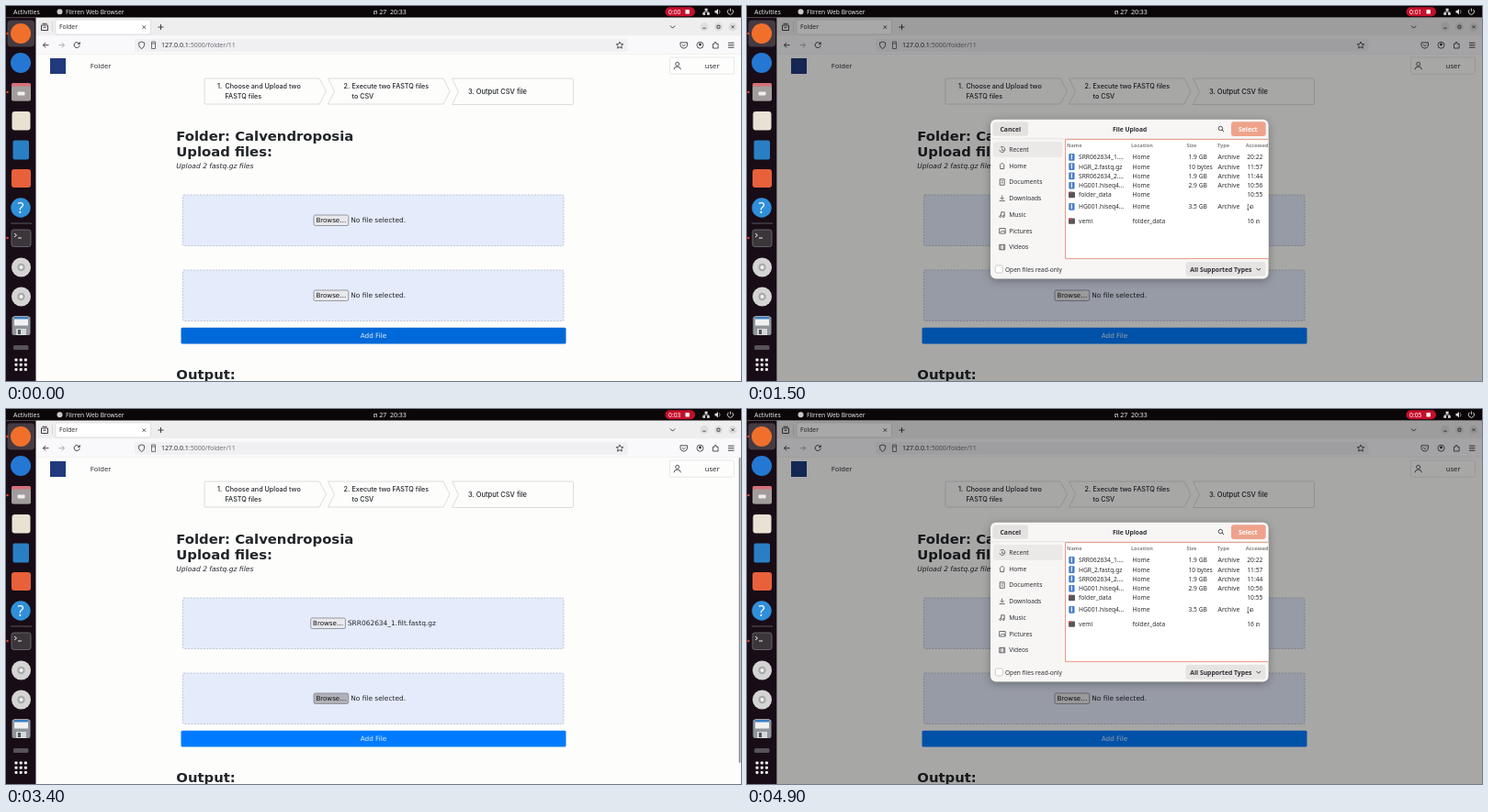
Write an HTML page that moves like this. It is 800 px wide and 409 px high and loops after 5400 ms.

```html
<!DOCTYPE html>
<html lang="en">
<head>
<meta charset="utf-8">
<title>Upload files</title>
<style>
html, body { margin: 0; width: 100%; height: 100%; overflow: hidden; background: #fdfdfc; }
svg { display: block; }
text { font-family: "Noto Sans", "DejaVu Sans", sans-serif; white-space: pre; }
.page { font-family: "DejaVu Sans", sans-serif; }
.step { font-family: Inter, sans-serif; font-weight: 500; }
.b { font-weight: 700; }
.i { font-style: italic; }
#dialog { filter: drop-shadow(0 2px 5px rgba(0, 0, 0, .3)); }
</style>
</head>
<body>
<svg id="stage" width="800" height="409" viewBox="0 0 800 409"></svg>
<script>
const INK = '#2e2e33', PAGE = '#212529';

const text = (x, y, s, size, fill = INK, extra = '') =>
  `<text x="${x}" y="${y}" font-size="${size}" fill="${fill}" ${extra}>${s}</text>`;
const rect = (x, y, w, h, fill, r = 0, extra = '') =>
  `<rect x="${x}" y="${y}" width="${w}" height="${h}" rx="${r}" fill="${fill}" ${extra}/>`;
const disc = (x, y, r, fill, extra = '') =>
  `<circle cx="${x}" cy="${y}" r="${r}" fill="${fill}" ${extra}/>`;
const line = (d, stroke = INK, w = .9, fill = 'none', extra = '') =>
  `<path d="${d}" stroke="${stroke}" stroke-width="${w}" fill="${fill}" ${extra}/>`;

function topBar() {
  return rect(0, 0, 800, 12.5, '#0b0608') +
    text(8, 9, 'Activities', 6.9, '#e6e6e6') +
    disc(58.5, 6.2, 3, '#c9c9c9') +
    text(65, 9, 'Flirren Web Browser', 6.7, '#e6e6e6') +
    text(400, 9.4, 'ຕ 27  20:33', 7, '#f0f0f0') +
    rect(717.5, 1.2, 32.5, 10, '#c5102c', 5) +
    text(721, 8.8, '0:00', 6.8, '#fff', 'id="timer"') +
    rect(739.5, 4, 4.4, 4.4, '#fff', .5) +
    rect(760.6, 2.7, 3, 2.6, '#ddd') + rect(758.3, 7.2, 2.8, 2.6, '#ddd') + rect(763, 7.2, 2.8, 2.6, '#ddd') +
    line('M762 5v1.3M759.7 7.5V6.3h4.7v1.2', '#ddd', .7) +
    line('M771.5 5h1.5l2-2v6.6l-2-2h-1.5z', 'none', 0, '#ddd') +
    line('M776.3 4.3q1.6 2 0 4', '#aaa', .8) +
    line('M786.4 3.8a3.1 3.1 0 1 0 4 0M788.4 2.5v3.4', '#ddd', .9);
}

function cd(y) {
  return disc(16.5, y, 10.5, '#d4d4d4') + disc(16.5, y, 4.2, '#a9a9a9') + disc(16.5, y, 2, '#f5f5f5');
}

function dock() {
  let s = rect(0, 12.5, 32.5, 396.5, '#180d16') + rect(1.5, 15.5, 29.5, 29, '#453b42', 4);
  for (const y of [30, 94, 253]) s += disc(1.5, y, 1.3, '#e0432a');
  s += disc(16, 30, 11, '#f0702b') + disc(16, 62, 11, '#2478d4');
  s += rect(6, 84, 21, 19.5, '#777', 2.5) + rect(6, 84, 21, 5, '#d6707a', 2) + rect(6, 87.5, 21, 16, '#a29d9c', 2) +
    rect(12.5, 93.5, 8, 4, '#eee', 1);
  s += rect(6.5, 115, 20, 20.5, '#e9e2d3', 3) + rect(7.5, 146.5, 17.5, 21, '#2a7fc4', 2) +
    rect(6, 178, 21, 20, '#e8613a', 3);
  s += disc(16, 220, 10.7, '#2f8fd8') + text(16, 225.8, '?', 16, '#fff', 'text-anchor="middle"');
  s += rect(5, 236.6, 23, .8, '#6d656b');
  s += rect(6, 244, 21, 18.5, '#3a363a', 2.5, 'stroke="#77727a" stroke-width=".8"') +
    line('M9 248l2.5 2-2.5 2M13 253h4', '#eee', 1);
  s += cd(285) + cd(317);
  s += rect(6.5, 338.5, 20, 20.5, '#8f959b', 2) + rect(9, 338.5, 15, 10, '#f1f1f1') +
    rect(9, 339, 15, 2.5, '#3d7fc0') + rect(11, 352, 11, 7, '#d5d8da') + rect(13, 353, 3, 5, '#555');
  s += rect(8, 370, 16.5, 5, '#55525a', 1.5);
  for (let k = 0; k < 9; k++) s += rect(9.5 + k % 3 * 5.2, 384.5 + (k / 3 | 0) * 5.2, 3, 3, '#f2f2f2', .8);
  return s;
}

function chrome() {
  return rect(32.5, 12.5, 767.5, 20, '#efeeee') +
    line('M38.5 21h7v5.5h-7zM39.5 19.3h5M40.5 23.3h3') +
    line('M50.5 17v11', '#c9c9cc', .6) +
    rect(54, 15, 103.5, 16, '#fff', 2, 'stroke="#cfcfd4" stroke-width=".6"') +
    text(58, 25.3, 'Folder', 6.7) +
    line('M148.5 21.3l3.6 3.6m0-3.6l-3.6 3.6', INK, .8) +
    line('M165.5 23h6m-3-3v6') +
    line('M723 21.5l2.6 2.6 2.6-2.6') +
    [760, 775.5, 791].map(x => disc(x, 22.7, 4.6, '#dededf')).join('') +
    line('M758.3 24.2h3.4M774 21.2h3v3h-3zM789.5 21.2l3 3m0-3l-3 3', INK, .8) +
    rect(32.5, 32.5, 767.5, 20, '#f9f9fb') +
    line('M46.5 42.7h-6m2.6-2.7l-2.7 2.7 2.7 2.7') +
    line('M57.5 42.7h6m-2.6-2.7l2.7 2.7-2.7 2.7', '#a5a5aa') +
    line('M79.7 41a3 3 0 1 0 .4 2M80.3 39.3v2.2h-2.2') +
    rect(140, 36, 536.5, 13.7, '#f0f0f3', 2) +
    line('M147.6 39l3 1v2.5q0 2.6-3 4-3-1.4-3-4V40z', INK, .8) +
    line('M158.5 39h4v7.5h-4zM158.5 41h4', '#55555a', .8) +
    text(169, 45.3, '127.0.0.1<tspan fill="#6d6d75">:5000/folder/11</tspan>', 7.06) +
    line('M668 39l1.1 2.4 2.7.3-2 1.8.6 2.6-2.4-1.3-2.4 1.3.6-2.6-2-1.8 2.7-.3z', INK, .8) +
    line('M734 39.8h7.5v3.2q-.6 3-3.7 3.2-3.200-.2-3.800-3.200zM736 42l1.800 1.700 1.800-1.700', INK, .8) +
    disc(755.5, 42.7, 3.5, 'none', `stroke="${INK}" stroke-width=".8"`) + disc(755.5, 42, 1.4, INK) +
    line('M769.5 41.3h1.6q-.4-2 1-2t1 2h2v4.7h-5.6z', INK, .8) +
    line('M786 40.2h6.5M786 42.7h6.5M786 45.2h6.5') +
    rect(32.5, 52, 767.5, .6, '#dcdce0');
}

function picker(n, y) {
  return rect(192.5, y, 414.5, 55.5, '#e4ebfa', 1.5, 'stroke="#a8b2c4" stroke-width=".7" stroke-dasharray="2 1.4"') +
    `<g id="picker${n}">` +
    rect(335, y + 22, 37.7, 11.5, '#e9e9ed', 1.6, `id="browse${n}" stroke="#85858f" stroke-width=".8"`) +
    text(337.4, y + 30.3, 'Browse…', 7.1, '#111', 'class="page"') +
    text(375.2, y + 30.3, 'No file selected.', 7.45, PAGE, `class="page" id="name${n}"`) + '</g>';
}

function page() {
  const box = 'stroke="#d9d9db" stroke-width=".9"';
  const step = (x, y, s, size = 7.2) => text(x, y, s, size, PAGE, 'class="step"');
  const head = (y, s) => text(185.3, y, s, 14.84, PAGE, 'class="page b"');
  return rect(32.5, 52.5, 767.5, 356.5, '#fdfdfc') +
    rect(48, 57, 17, 17, '#203a7d') +
    text(91.8, 68.2, 'Folder', 7.6) +
    rect(722.5, 56, 70, 18.3, '#fdfdfc', 1, 'stroke="#e3e3e5" stroke-width=".8"') +
    disc(730.7, 63.3, 2, 'none', `stroke="${INK}" stroke-width=".8"`) +
    line('M727 69.3q.3-3.2 3.7-3.2t3.7 3.2', INK, .8) +
    text(760.7, 67.7, 'user', 7.7) +
    `<g fill="#fdfdfc" ${box}><path d="M217 79h124l7.5 14-7.5 14H217q-1 0-1-1V80q0-1 1-1z"/>` +
    '<path d="M350.5 79H476l7 14-7 14H350.5l7-14z"/>' +
    '<path d="M485.5 79H616q1.5 0 1.5 1.5v25.5q0 1.5-1.5 1.5H485.5l7-14z"/></g>' +
    step(230, 90.4, '1.') + step(238.5, 90.4, 'Choose and Upload two') + step(238.5, 100.7, 'FASTQ files') +
    step(367.5, 90.4, '2.') + step(376.5, 90.4, 'Execute two FASTQ files') + step(376.5, 100.7, 'to CSV') +
    step(503, 96.2, '3. Output CSV file', 7.5) +
    head(147, 'Folder: Calvendroposia') + head(164, 'Upload files:') +
    text(185.3, 176.7, 'Upload 2 fastq.gz files', 7.55, PAGE, 'class="page i"') +
    picker(1, 206) + picker(2, 288) +
    rect(190.5, 350.8, 419, 17.7, '#007bff', 1.5, 'id="add"') +
    text(400, 362.4, 'Add File', 7.3, '#e8f1fb', 'class="page" text-anchor="middle"') +
    head(407, 'Output:') +
    rect(797.7, 53, 1.8, 333, '#8d8d91', .8, 'id="bar"');
}

const places = ['Recent', 'Home', 'Documents', 'Downloads', 'Music', 'Pictures', 'Videos'];
const glyphs = [
  'M1 1a3 3 0 1 1-.8 3M3 2v2h2', 'M0 3l3-3 3 3M1 3v3.5h4V3', 'M.5 0h5v6.5h-5zM2 2h2M2 4h2', 'M3 0v4M1 2.5l2 2 2-2M0 6h6',
  'M2 5V.5h3.5V5M2 5a1 1 0 1 1-.2-.5M5.5 5a1 1 0 1 1-.2-.5', 'M0 .5h6.5v5.5H0zM1 5l2-2 1 1 1-1 1 2',
  'M0 .5h6v5.5H0zM1.5 .5v5.5M4.5 .5v5.5'
];
const files = [
  [167.3, 'SRR062634_1.…', 'Home', '1.9 GB', '20:22'],
  [177.5, 'HGR_2.fastq.gz', 'Home', '10 bytes', '11:57'],
  [187.8, 'SRR062634_2.…', 'Home', '1.9 GB', '11:44'],
  [198.1, 'HG001.hiseq4…', 'Home', '2.9 GB', '10:56'],
  [208.4, 'folder_data', 'Home', '', '10:55'],
  [221.3, 'HG001.hiseq4…', 'Home', '3.5 GB', '[ຸຄ'],
  [237, 'vemi', 'folder_data', '', '16 ຕ']
];

function fileRow([y, name, place, size, time]) {
  const icon = size
    ? rect(350.3, y - 6.2, 6.2, 7.6, '#3f78c9', 1) + rect(352.6, y - 5.5, 1.5, 5.5, '#dfe9f7')
    : rect(350, y - 5.6, 7, 6.4, '#5c5658', 1) + rect(350, y - 5.6, 4, 1.6, name === 'vemi' ? '#cf4a52' : '#8a5560', .6);
  return icon + text(361, y, name, 6.7) + text(419.5, y, place, 6.7) +
    text(480.5, y, size, 6.7) + (size && text(512.5, y, 'Archive', 6.9)) + text(544.3, y, time, 6.7);
}

function dialog() {
  const bold = (x, y, s, size = 6.8, fill = INK) => text(x, y, s, size, fill, 'class="b"');
  return rect(265, 123.7, 302.6, 173.8, '#f7f6f5', 6) +
    rect(265.5, 144.5, 302, .6, '#dddad8') +
    rect(267.5, 126.5, 38.5, 15.3, '#e4e2e0', 3) + bold(275.5, 136.6, 'Cancel') +
    bold(398, 136.6, 'File Upload', 6.7) +
    disc(515.4, 133.5, 2.2, 'none', `stroke="${INK}" stroke-width=".8"`) + line('M517 135l2 2') +
    rect(527, 126.3, 37.7, 15.7, '#eea28b', 3, 'id="select"') + bold(535, 136.6, 'Select', 6.9, '#fff') +
    rect(346.5, 145.6, 221, 130, '#fff') + line('M567.5 145.6h-221v130h221', '#e89b84', 1) +
    rect(268, 148, 75.5, 17, '#ebe9e7', 3) +
    places.map((p, k) => line(glyphs[k], '#4a4a4f', .8, 'none', `transform="translate(274.7 ${153.3 + 17.75 * k})"`) +
      text(285.3, 158.8 + 17.75 * k, p, 6.7)).join('') +
    [[348, 'Name'], [418, 'Location'], [478.5, 'Size'], [512, 'Type'], [542.7, 'Accessed']]
      .map(([x, s]) => bold(x, 154.3, s, 5.5, '#85827f')).join('') +
    rect(347, 159.5, 220.5, 10.4, '#e6e4e2', 0, 'id="row"') +
    files.map(fileRow).join('') +
    rect(270.3, 283, 8, 8, '#fff', 1.5, 'stroke="#c5c1be" stroke-width=".8"') +
    text(281, 289.5, 'Open files read-only', 6.55) +
    rect(477.5, 279, 87, 15.7, '#e6e4e2', 3) + bold(482.3, 289.5, 'All Supported Types') +
    line('M554.5 286l2.3 2.3 2.3-2.3');
}

const $ = id => document.getElementById(id);
$('stage').innerHTML = chrome() + page() +
  rect(32.5, 12.5, 767.5, 396.5, '#000', 0, 'id="dim"') +
  `<g id="dialog">${dialog()}</g>` + dock() + topBar();

const clamp = v => Math.max(0, Math.min(1, v));
const easeOut = v => 1 - (1 - clamp(v)) ** 2;
const set = (id, name, value) => $(id).setAttribute(name, value);
const mix = (a, b, k) => a.map((v, n) => Math.round(v + (b[n] - v) * k));

const FIRST = 980, CLOSE = 2728, SECOND = 3680, PIVOT = 213;
const IDLE = '#e9e9ed', HOVER = '#d0d0d7', PRESSED = '#b1b1b9';

function draw(t) {
  const closing = t >= CLOSE && t < SECOND;
  const since = t - (t >= SECOND ? SECOND : FIRST);
  const scale = closing ? 1 - easeOut((t - CLOSE) / 100) : easeOut(since / 100);
  const dim = closing ? 1 - clamp((t - CLOSE) / 250) : clamp(since / 500);
  set('dim', 'opacity', .34 * dim);
  set('dialog', 'display', scale > 0 ? 'inline' : 'none');
  set('dialog', 'transform', `translate(0 ${PIVOT * (1 - scale)}) scale(1 ${scale})`);

  const picked = t >= 2000 && t < SECOND;
  set('row', 'opacity', picked ? 1 : t >= 1700 && t < 2000 ? .5 : 0);
  set('select', 'fill', picked ? '#ea8568' : '#eea28b');

  const done = t >= 3000;
  set('picker1', 'transform', `translate(${done ? -3.3 : 0} 0)`);
  $('name1').textContent = done ? 'SRR062634_1.filt.fastq.gz' : 'No file selected.';
  set('browse1', 'fill', t >= 700 && t < 1000 ? PRESSED : t >= 300 && t < 1500 ? HOVER : IDLE);
  set('browse2', 'fill', t < 3100 || t >= 4400 ? IDLE : t >= 3400 && t < 3600 ? PRESSED : HOVER);

  set('add', 'fill', `rgb(${mix([0, 105, 217], [0, 123, 255], clamp((t - 50) / 150))})`);
  set('bar', 'opacity', done ? 1 - clamp((t - 4300) / 200) : 0);
  $('timer').textContent = '0:0' + Math.floor((t + 200) / 1000);
}

const start = performance.now();
function tick() {
  draw(Math.floor((performance.now() - start) % 5400 / 100) * 100);
  requestAnimationFrame(tick);
}
tick();
</script>
</body>
</html>
```
